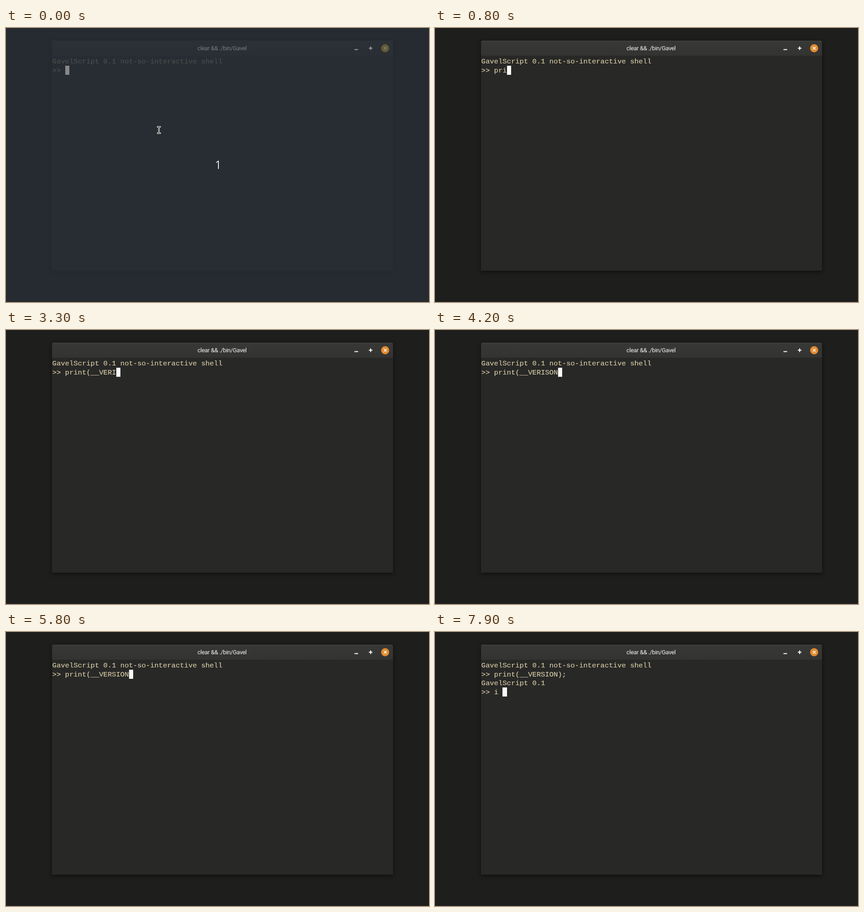
An HTML page for the animation above (8000 ms loop, 928x603 px).

```html
<!DOCTYPE html>
<html lang="en">
<head>
<meta charset="utf-8">
<title>Terminal session</title>
<style>
  html, body { margin: 0; width: 100%; height: 100%; overflow: hidden; background: #1e1e1c; }
  svg { display: block; width: 928px; height: 603px; }
  .mono {
    font: 15.55px "Liberation Mono", monospace; white-space: pre;
    fill: #d9cda6; stroke: #d9cda6; stroke-width: .15px;
  }
  .title { font: 13px Roboto, sans-serif; letter-spacing: -.35px; fill: #f2f2f0; }
  .count { font: 25px "Open Sans", sans-serif; fill: #e4e5e7; }
</style>
</head>
<body>
<svg viewBox="0 0 928 603">
  <defs>
    <linearGradient id="bar" x2="0" y2="1">
      <stop stop-color="#383837"/><stop offset="1" stop-color="#333332"/>
    </linearGradient>
    <filter id="blur" x="-10%" y="-10%" width="120%" height="120%">
      <feGaussianBlur stdDeviation="5"/>
    </filter>
  </defs>
  <rect width="928" height="603" fill="#1e1e1c"/>
  <rect x="101" y="31" width="748" height="506" fill="#000" opacity=".5" filter="url(#blur)"/>
  <rect x="101" y="61" width="748" height="473" fill="#282827"/>
  <path d="M101 61V31q0-3 3-3H846q3 0 3 3V61z" fill="url(#bar)"/>
  <path d="M103 28.5H847" stroke="#4b4b49"/>
  <g id="lines" class="mono"></g>

  <rect id="veil" width="928" height="603" fill="#292d36" opacity=".8"/>
  <path d="M0 602.5H928" stroke="#2a272b"/>
  <rect id="cursor" height="20" fill="#f8f8f5"/>
  <text id="title" class="title" x="474" y="49" text-anchor="middle">clear &amp;&amp; ./bin/Gavel</text>
  <path id="buttons" d="M764.5 47.5h8M796 44.5h8M800 40.5v8" stroke="#fff" stroke-width="2"/>
  <g id="close">
    <circle cx="831.8" cy="44.5" r="8.9"/>
    <path d="M829 41.5l6 6m0-6l-6 6" stroke="#fff" stroke-width="1.7"/>
  </g>
  <g id="pointer" fill="none">
    <path d="M331.5 217.5h8M331.5 231.5h8M335.5 216v17" stroke="#fff" stroke-width="3"/>
    <path d="M332.5 217.5h6M332.5 231.5h6M335.5 217v15" stroke="#111"/>
  </g>
  <text id="count" class="count" x="465.5" y="310" text-anchor="middle">1</text>
</svg>
<script>
const $ = id => document.getElementById(id);
const LOOP = 8000, LEFT = 101.6, CELL = 9.333, TOP = 63.5, ROW = 19.6;
const banner = "GavelScript 0.1 not-so-interactive shell";

// [time, key]; "<" is backspace, "\n" is enter
const keys = [
  [600, "p"], [700, "r"], [800, "i"], [1200, "n"], [1300, "t"], [1300, "("],
  [1900, "_"], [2300, "_"], [2800, "V"], [2900, "E"], [3000, "R"],
  [3300, "I"], [3500, "S"], [3700, "O"], [4200, "N"],
  [4300, "<"], [4400, "<"], [4500, "<"], [4800, "<"],
  [4900, "S"], [5100, "I"], [5200, "O"], [5800, "N"], [6200, ")"], [6400, ";"],
  [6800, "\n"], [7800, "i"], [7900, " "]
];

const rows = [0, 1, 2, 3].map(i => {
  const row = document.createElementNS("http://www.w3.org/2000/svg", "text");
  row.setAttribute("x", LEFT);
  row.setAttribute("y", Math.round(TOP + 14.7 + i * ROW));
  $("lines").append(row);
  return row;
});

function screen(t) {
  const lines = [banner, ">> "];
  for (const [at, key] of keys) {
    if (at > t) break;
    const last = lines.length - 1;
    if (key === "\n") lines.push("GavelScript 0.1", ">> ");
    else if (key === "<") lines[last] = lines[last].slice(0, -1);
    else lines[last] += key;
  }
  return lines;
}

const between = (t, a, b) => t >= a && t < b;
const column = n => Math.round(LEFT + n * CELL);
const show = (id, on) => $(id).setAttribute("visibility", on ? "visible" : "hidden");
const fade = (id, opacity) => $(id).setAttribute("opacity", opacity);

function draw(t) {
  const lines = screen(t), last = lines.length - 1, dim = t < 100;
  const col = lines[last].length, cursor = $("cursor");
  rows.forEach((row, i) => row.textContent = lines[i] || "");
  cursor.setAttribute("x", column(col));
  cursor.setAttribute("width", column(col + 1) - column(col));
  cursor.setAttribute("y", Math.round(TOP + last * ROW));
  show("cursor", !between(t, 100, 500) && !between(t, 7000, 7600));
  show("pointer", t < 600);
  show("veil", dim);
  show("count", dim);
  fade("cursor", dim ? .45 : 1);
  fade("title", dim ? .38 : 1);
  fade("buttons", dim ? .5 : 1);
  fade("close", dim ? .4 : 1);
  $("close").setAttribute("fill", dim ? "#b59a30" : "#e18b30");
}

const start = performance.now();
function tick() {
  draw((performance.now() - start) % LOOP);
  requestAnimationFrame(tick);
}
tick();
</script>
</body>
</html>
```
